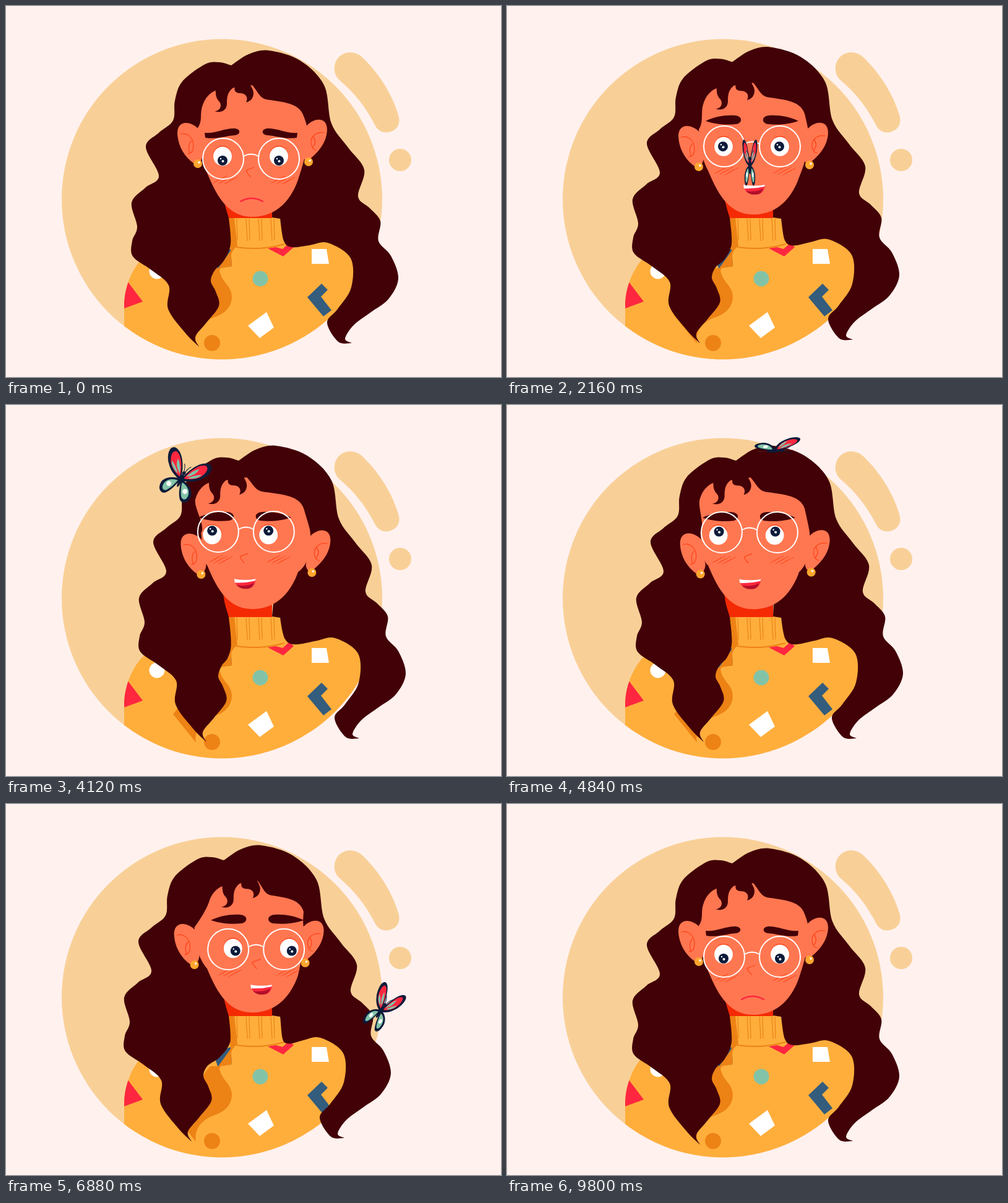
An HTML page that plays this animation: 800x600 px, repeating every 9840 ms.

```html
<!DOCTYPE html>
<html lang="en">
<head>
<meta charset="utf-8">
<title>Girl and butterfly</title>
<style>
html, body { margin: 0; width: 100%; height: 100%; overflow: hidden; background: #fff1ee; }
svg { display: block; width: 100vw; height: 100vh; }
.line { fill: none; stroke: #ff4217; stroke-width: 1.2; stroke-linecap: round; }
.hair { fill: #420107; }
.skin { fill: #ff7751; }
</style>
</head>
<body>
<svg viewBox="0 0 800 600">
  <defs>
    <clipPath id="disc"><circle cx="349" cy="312.5" r="259"/></clipPath>
    <clipPath id="top"><path d="M191,600 V482 C192,455 202,428 220,408 L362,342 H436 Q442,342 443,346 L452,380 L520,370 L600,400 V600Z"/></clipPath>
    <g id="wing">
      <path fill="#0d1b3a" d="M1,0 C12,0 28,8 28,20 C28,31 20,35 14,31 C7,24 3,12 1,0Z"/>
      <path fill="#82c3a8" d="M4,4 C12,4 23,10 23,20 C23,28 18,29 14,26 C9,20 6,12 4,4Z"/>
      <circle cx="15" cy="15" r="4" fill="#fff"/>
      <path fill="#0d1b3a" d="M1,-4 C6,-22 18,-42 32,-42 C44,-40 38,-22 30,-14 C22,-4 10,0 1,2Z"/>
      <path fill="#ff273f" d="M4,-5 C8,-20 18,-37 28,-37 C36,-35 32,-22 26,-15 C19,-8 10,-4 4,-3Z"/>
      <path fill="#82c3a8" d="M6,-7 Q10,-20 20,-28 Q20,-16 6,-7Z M9,-6 Q18,-16 28,-21 Q24,-10 9,-6Z"/>
    </g>
  </defs>

  <rect width="800" height="600" fill="#fff1ee"/>
  <g fill="#f8d097">
    <circle cx="349" cy="312.5" r="259"/>
    <path d="M538,119 C565,142 582,165 596,192 C601,203 612,207 622,203 C634,199 638,188 634,176 C624,143 604,110 576,83 C566,74 552,72 541,80 C529,89 527,108 538,119Z"/>
    <circle cx="637" cy="249" r="18"/>
  </g>

  <g clip-path="url(#disc)"><g clip-path="url(#top)">
    <rect x="180" y="340" width="430" height="260" fill="#ffae3c"/>
    <path fill="#ff273f" d="M196,445 L221,478 L188,490 V445Z M423,392 L448,405 L465,390 L458,383 L447,393 L436,390Z"/>
    <path fill="#335c7d" d="M335,403 L363,393 L365,421 L342,424Z M510,449 L520,459 L509,470 L526,492 L513,502 L487,471Z"/>
    <path fill="#ed8215" d="M358,342 H369 L374,388 Q366,394 364,402 L365,421 L347,424 L345,428 C349,448 365,452 365,471 C364,492 347,500 335,504 C318,510 303,525 307,546 L270,500 L330,424 H343 L363,396Z"/>
    <path fill="#fff" d="M494,393 H518 L522,417 H494Z M421,495 L433,520 L410,537 L391,517Z"/>
    <circle cx="244" cy="429" r="12.5" fill="#fff"/>
    <circle id="dot" cx="411" cy="441" r="12.5" fill="#82c3a8"/>
    <circle cx="333" cy="545" r="13" fill="#ed8215"/>
    <path fill="none" stroke="#ed8215" stroke-width="2" d="M372,390 Q412,396 450,385"/>
    <path id="ribs" fill="none" stroke="#ed8215" stroke-width="1.2"/>
  </g></g>

  <path id="hair" class="hair"/>
  <path fill="#f42a05" d="M350,300 H430 V343 H360 C358,335 355,328 353,318Z"/>
  <g id="ears">
    <path class="skin" d="M312,200 C300,186 277,183 277,206 C278,228 290,245 303,254 C312,258 317,250 318,240Z M484,196 C495,181 519,177 519,200 C518,225 500,240 488,250 C480,250 478,240 480,235Z"/>
    <path class="line" d="M282,207 C292,204 303,212 303,226 Q303,238 294,239 M297,238 Q293,223 300,218 M514,205 C500,203 492,212 493,222 Q494,231 501,233 M496,211 Q503,219 496,228"/>
  </g>
  <path id="face" class="skin"/>
  <path id="curls" class="hair" d="M339,130 C338,145 340,150 345,155 C350,162 345,170 337,170 C348,174 357,168 357,158 C357,146 358,138 370,130 C368,137 371,141 378,141 C388,141 392,148 388,156 C396,154 400,148 400,141 C400,135 396,130 394,126 L370,120Z"/>
  <g id="rings"></g>
  <path id="blush" class="line" style="stroke-width:.9"/>
  <g id="eyes"></g>
  <path id="browL" class="hair"/>
  <path id="browR" class="hair"/>
  <path id="nose" class="line" d="M401,261 Q394,263 388,266 Q390,271 395,276"/>
  <g id="glasses" fill="none" stroke="#fff" stroke-width="2">
    <circle cx="351" cy="247" r="33"/><circle cx="441" cy="247" r="33"/>
    <path d="M384,243 Q396,236 408,243"/>
  </g>
  <g id="mouth">
    <g id="smile">
      <path fill="#ff273f" d="M383,302 Q400,305 417,302 C416,312 411,319 400,318 C388,317 382,310 383,302Z"/>
      <path fill="#b30f2b" d="M386,312 Q403,315 414,308 Q412,318 400,318 Q391,318 386,312Z"/>
      <path fill="#fff" d="M382,302 Q400,305 417,302 L416,305 Q400,309 383,308Z"/>
    </g>
    <path id="lip" fill="none" stroke="#ff273f" stroke-width="2.5" stroke-linecap="round"/>
  </g>

  <g id="fly">
    <g id="wingL"><use href="#wing"/></g>
    <g id="wingR"><use href="#wing"/></g>
    <ellipse cy="2" rx="2.6" ry="12" fill="#0d1b3a"/>
    <circle cy="-11" r="2.8" fill="#0d1b3a"/>
    <path d="M-1,-12 Q-2,-20 -6,-25 M1,-12 Q2,-20 6,-25" fill="none" stroke="#0d1b3a"/>
  </g>
</svg>
<script>
const LOOP = 9840;
const $ = id => document.getElementById(id);
const set = (id, name, value) => $(id).setAttribute(name, value);
const show = (id, on) => set(id, 'visibility', on ? 'visible' : 'hidden');
const move = (id, x, y, more = '') => set(id, 'transform', `translate(${x} ${y}) ${more}`);
const clamp = (v, a = 0, b = 1) => Math.min(b, Math.max(a, v));
const mix = (a, b, u) => a + (b - a) * u;
const smooth = u => u * u * (3 - 2 * u);
const points = s => s.split(' ').map(p => p.split(',').map(Number));

// strands meet in sharp corners and are smooth in between
const rightOuter = points('364,96 392,78 425,72 475,88 514,128 526,190 553,229 579,265 569,308 588,327 605,348 602,380 622,404 634,441 618,474 590,495 562,516 548,538 559,545');
const rightInner = points('559,545 537,543 519,512 536,490 558,455 557,408 520,383 490,387 462,390 449,380 443,344');
const leftInner = points('360,342 363,385 352,412 337,428 331,445 339,462 344,485 324,512 306,535 312,551');
const leftOuter = points('312,551 290,529 262,490 263,452 235,427 205,405 204,380 212,357 203,318 225,294 247,275 226,228 247,205 270,185 273,153 285,122 322,94 345,91 364,96');

const FACE = 'M310,197 C318,186 313,175 317,163 C321,149 330,139 341,136 L398,128 C405,135 409,148 420,151 ' +
  'C442,155 474,155 481,178 Q485,188 486,194 C490,225 482,250 472,281 C462,310 440,341 398,341 ' +
  'C355,341 338,300 325,270 C314,245 312,220 310,197Z';
const BROW_SAD = [321, 205, 336, 207, 352, 198, 368, 198, 380, 198, 380, 208, 370, 209, 355, 210, 340, 216, 322, 213];
const BROW_GLAD = [321, 203, 335, 196, 353, 193, 368, 194, 381, 195, 381, 206, 371, 208, 355, 210, 335, 208, 321, 203];

// turn, hair y, ear drop, glasses rise, brow rise, gaze x, gaze y, smile, sadness
const POSE = {
  sad: [0, 0, 0, 0, 0, 0, 7, 0, 1],
  glad: [0, -.5, .3, .7, 0, -1, 6.5, 1, 0],
  front: [0, -5.5, 5, 20, 17, -1, 0, 1, 0],
  left: [12, -6, 19, 42, 21, 0, -6.5, 1, 0],
  right: [-12, -6, 17, 38, 20, 4, -4, 1, 0],
  low: [-12, -5, 5, 12, 15, 4, 4, 1, 0],
  flat: [-12, -6, 17, 39.5, 21, 3, -1, 0, 0]
};
const ACTS = [
  [0, 'sad'], [350, 'sad'], [950, 'glad'], [1250, 'glad'], [1950, 'front'], [3400, 'front'],
  [3950, 'left'], [4527, 'left'], [5487, 'right'], [6100, 'low'], [7100, 'low'],
  [7700, 'right'], [8100, 'right'], [8450, 'flat'], [8750, 'flat'], [9500, 'sad'], [LOOP, 'sad']
];
// time, x, y, angle
const FLIGHT = [
  [0, 470, 650, -20], [500, 440, 530, -30], [900, 390, 434, -33], [1320, 390, 434, -33],
  [1600, 412, 350, 0], [1950, 394, 258, 0], [3200, 392, 258, 0], [3360, 369, 253, 0],
  [3750, 292, 195, -20], [4150, 285, 115, 30], [4500, 352, 72, 70], [4840, 433, 74, 86],
  [5040, 488, 104, 100], [5400, 550, 190, 120], [5750, 580, 280, 90], [6000, 592, 320, 60],
  [6250, 620, 328, 40], [6550, 606, 334, 34], [7050, 606, 334, 34], [7450, 628, 260, 25],
  [8070, 692, -50, 20], [LOOP, 692, -60, 20]
];

function span(keys, t) {
  let i = 0;
  while (i < keys.length - 2 && t >= keys[i + 1][0]) i++;
  return [i, clamp((t - keys[i][0]) / (keys[i + 1][0] - keys[i][0]))];
}

function poseAt(t) {
  const [i, u] = span(ACTS, t);
  const next = POSE[ACTS[i + 1][1]];
  return POSE[ACTS[i][1]].map((v, j) => mix(v, next[j], smooth(u)));
}

function glide(keys, t) {
  const [i, u] = span(keys, t);
  const a = keys[i], b = keys[i + 1], d = b[0] - a[0];
  const slope = (k, j) => {
    const p = keys[k - 1], q = keys[k + 1];
    if (!p || !q || p[j] === keys[k][j] || q[j] === keys[k][j]) return 0;
    return (q[j] - p[j]) / (q[0] - p[0]);
  };
  return a.map((v, j) => mix(v, b[j], smooth(u)) +
    d * u * (1 - u) * (slope(i, j) * (1 - u) - slope(i + 1, j) * u)).slice(1);
}

// rises to 1 between a and b, with soft ends
const during = (t, a, b, soft) => smooth(clamp((t - a) / soft + 1)) * smooth(clamp((b - t) / soft + 1));

const warp = (path, fn) => path.replace(/([\d.]+),([\d.]+)/g, (_, x, y) =>
  fn(+x, +y).map(v => v.toFixed(2)).join(','));

// cubic segments through every point
function curve(list) {
  return list.slice(1).map((q, i) => {
    const p = list[i], o = list[i - 1] || p, r = list[i + 2] || q;
    const c1 = p.map((v, k) => v + (q[k] - o[k]) / 6);
    const c2 = q.map((v, k) => v - (r[k] - p[k]) / 6);
    return `C${[c1, c2, q].map(c => c.map(v => v.toFixed(2)).join(',')).join(' ')}`;
  }).join('');
}

const HAIR = `M364,96${curve(rightOuter)}${curve(rightInner)}L430,342 L430,300 L355,300 L360,342${curve(leftInner)}${curve(leftOuter)}Z`;

function browPath(sad) {
  const p = BROW_GLAD.map((v, i) => mix(v, BROW_SAD[i], sad));
  return `M${p.slice(0, 2)}C${p.slice(2)}Z`;
}

function build() {
  $('eyes').innerHTML = ['L', 'R'].map(s => `<g id="eye${s}">
    <ellipse cy="-1" rx="15.3" ry="16" fill="#ff4217"/>
    <g id="ball${s}"><ellipse rx="15" ry="15.5" fill="#fff"/>
      <g id="pupil${s}"><circle r="8" fill="#0d1b3a"/><circle cx=".5" cy="1" r="2" fill="#fff"/><circle cx="-3" cy="-3" r="1.2" fill="#fff"/></g>
    </g></g>`).join('');
  $('rings').innerHTML = [[310, 255], [489, 252]].map(([x, y]) =>
    `<circle cx="${x}" cy="${y}" r="7" fill="#ffa62f"/><circle cx="${x + 2}" cy="${y - 2}" r="1.8" fill="#fff"/>`).join('');
  set('ribs', 'd', [368, 388, 408, 428].map(x =>
    `M${x},344 l2,36 M${x + 5},344 l1,35`).join(''));
  set('blush', 'd', [336, 430].map(x => [0, 1, 2, 3, 4, 5].map(i =>
    `M${x + i * 4},${286 - i % 2 * 3 + i * .6} l${14 + i % 2 * 3},${-8 - i % 2}`).join('')).join(''));
}

function drawGirl(t) {
  const [dx, dy, drop, rise, brow, gx, gy, smile, sad] = poseAt(t);
  const lift = .5 * drop - .25 * dy;
  const mid = -1.2 * dy + .32 * rise;

  // the hair stays put around the collar
  set('hair', 'd', warp(HAIR, (x, y) => {
    const w = clamp((Math.hypot(x - 400, y - 355) - 45) / 55);
    return [x + dx * w, y + dy * w];
  }));
  set('face', 'd', warp(FACE, (x, y) => {
    if (y < 185) return [x - .9 * dx * clamp((480 - x) / 100), y - lift];
    if (y < 260) return [x + .45 * dx, y + .5 * drop];
    return [x, y - lift];
  }));
  move('curls', -.9 * dx, -lift);
  move('ears', .45 * dx, drop);
  move('rings', .45 * dx, drop);
  move('blush', -.65 * dx, -.75 * rise);
  move('nose', -.83 * dx, -mid);
  move('glasses', -.68 * dx, -rise);

  const shape = browPath(sad);
  set('browL', 'd', shape);
  set('browR', 'd', shape);
  move('browL', -.85 * dx, -brow);
  move('browR', 792 - .85 * dx, -brow, 'scale(-1 1)');

  const open = clamp((Math.abs(t - 8600) - 50) / 90);
  for (const [s, x] of [['L', 350], ['R', 441]]) {
    move('eye' + s, x - 1.4 * dx, 243 - .79 * rise);
    set('ball' + s, 'transform', `scale(1 ${open})`);
    show('ball' + s, open > .02);
    move('pupil' + s, gx, gy);
  }

  move('mouth', -1.1 * dx, -mid);
  move('smile', 0, 303 * (1 - smile), `scale(1 ${smile})`);
  show('smile', smile > .1);
  show('lip', smile <= .1);
  const y = 303 + 13 * sad, x = 400 - 3 * sad;
  set('lip', 'd', `M${x - 18},${y} Q${x},${303 + 3 * sad} ${x + 18},${y}`);
}

function drawFly(t) {
  const [x, y, angle] = glide(FLIGHT, t);
  const chest = during(t, 900, 1320, 250);
  const rest = Math.max(chest, during(t, 6550, 7050, 300));
  const beat = Math.cos((t - 3360) / 310 * 2 * Math.PI);
  const spread = .58 - .4 * mix(1, .1, rest) * beat;
  move('fly', x, y, `rotate(${angle})`);
  set('wingL', 'transform', `scale(${-spread * (1 - chest)} 1)`);
  set('wingR', 'transform', `scale(${spread * (1 - during(t, 4500, 4880, 300))} 1)`);
  show('dot', t < 950 || t > 1360);
}

function frame() {
  const t = performance.now() % LOOP;
  drawGirl(t);
  drawFly(t);
  requestAnimationFrame(frame);
}
build();
frame();
</script>
</body>
</html>
```
